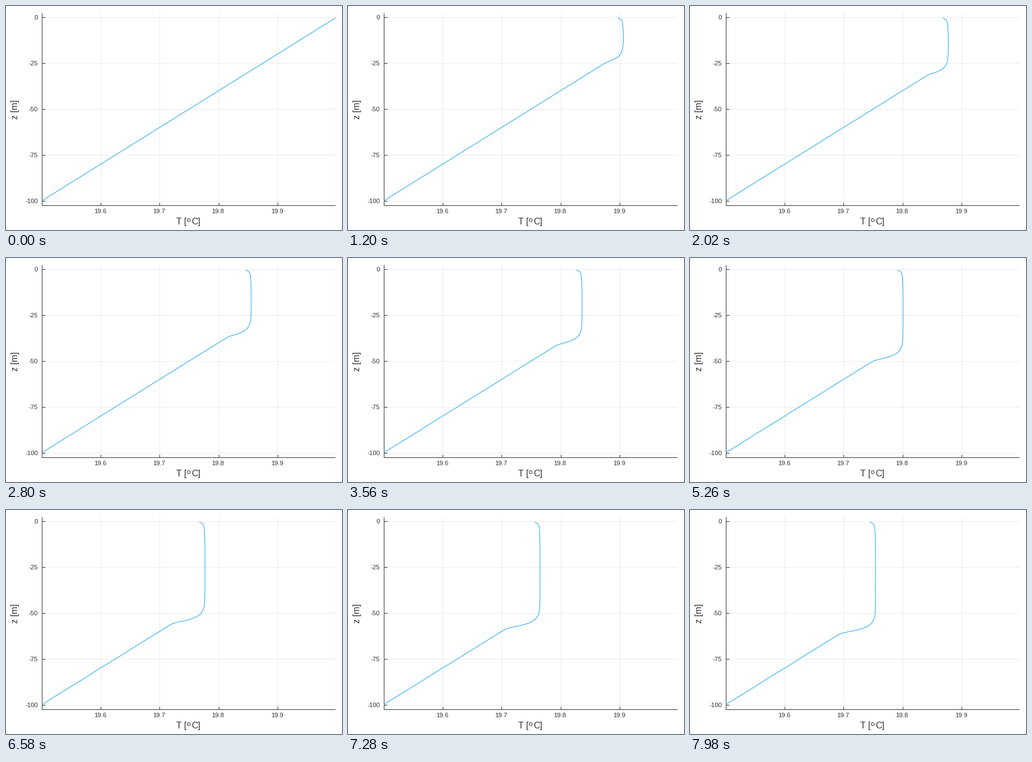
Recreate the animation shown at these times as a matplotlib script. Size 600 px wide and 400 px high, loop 8000 ms.

```python
import numpy as np
import matplotlib.pyplot as plt
from matplotlib.animation import FuncAnimation
from matplotlib.patches import Circle, Rectangle

W, H, DPI = 600, 400, 100
FRAMES, STEP = 400, 20
LEFT, RIGHT, TOP, BOTTOM = 64.1, 588, 12, 356.1
INK = "#303030"
PX_DEG, PX_M = 1052.0, 3.276          # pixels per degree and per metre
X20, Y0 = 590.0, 20.3                 # where 20 degrees and z = 0 lie
SLOPE = 0.005 * PX_DEG / PX_M         # initial gradient in pixel units


def px(temp):
    return X20 + (temp - 20) * PX_DEG


def py(z):
    return Y0 - z * PX_M


plt.rcParams["font.family"] = "Liberation Sans"
fig = plt.figure(figsize=(W / DPI, H / DPI), dpi=DPI, facecolor="white")
ax = fig.add_axes([0, 0, 1, 1])
ax.set_xlim(0, W)
ax.set_ylim(H, 0)
ax.axis("off")


def rule(x, y, **kw):
    ax.plot(x, y, lw=0.72, solid_capstyle="butt", **kw)


def label(x, y, text, size, **kw):
    ax.text(x, y, text, fontsize=size * 72 / DPI, color=INK, **kw)


for temp in (19.6, 19.7, 19.8, 19.9):
    x = px(temp)
    rule([x, x], [TOP, BOTTOM], color="black", alpha=0.08)
    rule([x, x], [BOTTOM, BOTTOM - 5], color=INK)
    label(x - 1, 370, f"{temp}", 11.4, ha="center", va="baseline")
for z in range(0, -101, -25):
    y = py(z)
    rule([LEFT, RIGHT], [y, y], color="black", alpha=0.08)
    rule([LEFT, LEFT + 6], [y, y], color=INK)
    label(57.3, y + 4.2, f"{z}", 11.4, ha="right", va="baseline")
rule([LEFT, LEFT], [TOP, BOTTOM], color=INK)
rule([LEFT, RIGHT], [BOTTOM, BOTTOM], color=INK)

label(303.8, 390, "T [", 16, ha="left", va="baseline")
label(347.5, 390, "C]", 16, ha="right", va="baseline")
ax.add_patch(Circle((326.3, 382.5), 2.7, fill=False, ec=INK, lw=0.72))
label(24.3, 184.5, "z [m]", 16, rotation=90, ha="right", va="center")

CELL = 100 / 128
depth = (np.arange(129) + 0.5) * CELL * PX_M   # pixels below the surface


def profile(t):
    """Horizontal pixel position of each cell at time t in seconds."""
    line = X20 - SLOPE * depth
    if t == 0:
        return line
    # the mixed layer cools and deepens with the square root of time
    drop = PX_DEG * np.sqrt(0.00764 * (t - 0.063 * (1 - np.exp(-t / 0.1))))
    mixed = drop / SLOPE
    s = depth / mixed

    # entrainment zone: exponential rise that softly joins the line
    thick = min(8, 0.2 * mixed)
    rise = 0.16 * np.exp(np.minimum((depth - 1.215 * mixed) / thick, 4))
    soft = 0.02
    joined = -soft * np.logaddexp(-rise / soft, -(s - 1) / soft)
    x = X20 - drop * (1 + np.where(s < 1.15, rise, joined))

    # cool skin at the surface
    a = depth - depth[0]
    x -= min(1, mixed / 25) * (6 * np.exp(-a / 2) + 3.5 * np.exp(-a / 12))

    # faint internal waves below the mixed layer
    calm = np.clip((s - 1.3) / 0.3, 0, 1) * t / 8
    return x + calm * (0.5 * np.sin(depth / 7.5 - 1.7 * t) - 0.6)


curve, = ax.plot([], [], color="#009AFA", lw=0.66, solid_joinstyle="round")
curve.set_clip_path(Rectangle((LEFT, TOP), RIGHT - LEFT + 0.5, BOTTOM - TOP,
                              transform=ax.transData))


def draw(i):
    curve.set_data(profile(i * STEP / 1000), Y0 + depth)
    return curve,


anim = FuncAnimation(fig, draw, frames=FRAMES, interval=STEP, repeat=True,
                     repeat_delay=0, blit=False)
plt.show()
```
